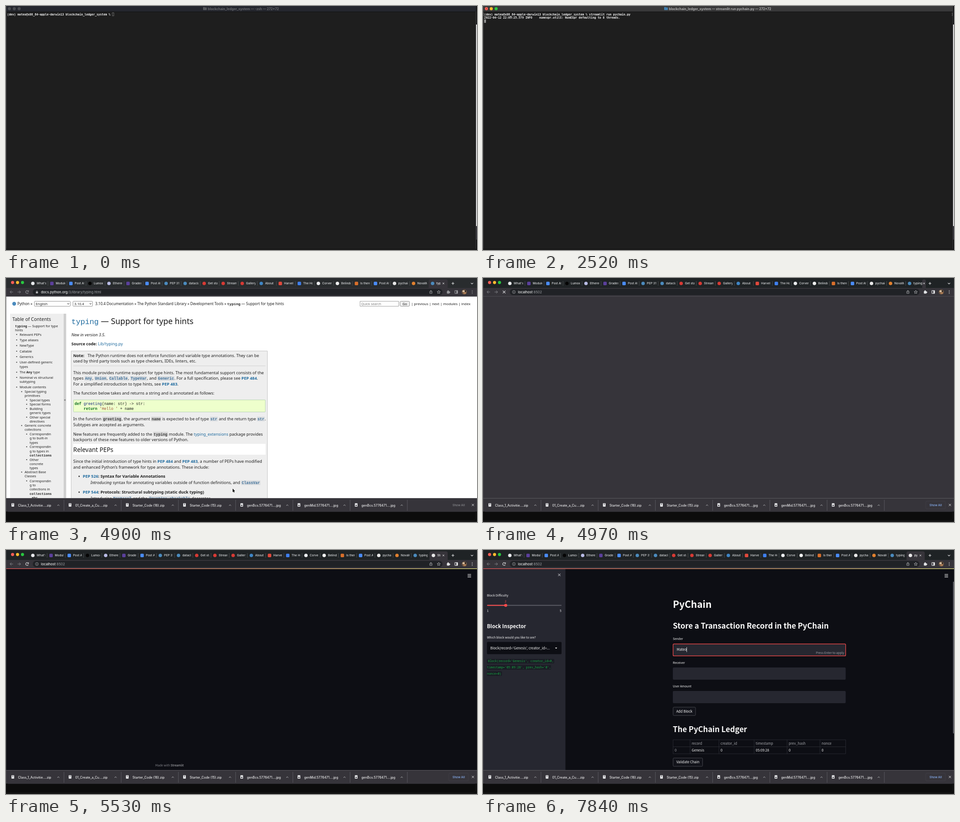
Recreate the animation shown at these times as an HTML page with a canvas. Size 1037 by 540 pixels, loop 8 s.

```html
<!DOCTYPE html>
<html lang="en">
<head>
<meta charset="utf-8">
<title>Ledger demo</title>
<style>
html, body { margin: 0; width: 100%; height: 100%; overflow: hidden; background: #1e1e1e; }
canvas { display: block; width: 1037px; height: 540px; }
</style>
</head>
<body>
<canvas id="stage"></canvas>
<script>
const W = 1037, H = 540, LOOP = 8000, STEP = 70;
const UI = 'Inter, sans-serif';
const TERM = '"DejaVu Sans Mono", monospace';
const DOC = '"Noto Sans", sans-serif';
const COURIER = '"Liberation Mono", monospace';
const APP = '"Noto Sans CJK JP", "Noto Sans CJK SC", "Open Sans", sans-serif';
const CODE = '"Noto Sans Mono", monospace';
const BAR = '#36343a', RED = '#ff4b4b', FIELD = '#262730', PAGE = '#0d0e14';

const canvas = document.getElementById('stage');
const c = canvas.getContext('2d');
const dpr = window.devicePixelRatio || 1;
canvas.width = W * dpr;
canvas.height = H * dpr;

const clamp = v => Math.max(0, Math.min(1, v));

// Text is set large and scaled down so that small advances stay fractional.
function text(s, x, y, size, color, o = {}) {
  const k = 8;
  c.save();
  c.translate(x, y + size * 0.36);
  c.scale(1 / k, 1 / k);
  c.font = `${o.style || 'normal'} ${o.weight || 400} ${size * k}px ${o.font || UI}`;
  c.textAlign = o.align || 'left';
  c.fillStyle = color;
  c.fillText(s, 0, 0);
  const w = c.measureText(s).width / k;
  c.restore();
  return w;
}

function box(x, y, w, h, fill, r = 0, stroke, lw = 1) {
  c.beginPath();
  c.roundRect(x, y, w, h, r);
  if (fill) { c.fillStyle = fill; c.fill(); }
  if (stroke) { c.strokeStyle = stroke; c.lineWidth = lw; c.stroke(); }
}

function dot(x, y, r, fill) {
  c.beginPath();
  c.arc(x, y, r, 0, 7);
  c.fillStyle = fill;
  c.fill();
}

function ring(x, y, r, color, lw, a = 0, b = 6.3) {
  c.beginPath();
  c.arc(x, y, r, a, b);
  c.strokeStyle = color;
  c.lineWidth = lw;
  c.stroke();
}

function line(color, lw, ...p) {
  c.beginPath();
  for (let i = 0; i < p.length; i += 2) c.lineTo(p[i], p[i + 1]);
  c.strokeStyle = color;
  c.lineWidth = lw;
  c.stroke();
}

function cross(x, y, r, color, lw = 1) {
  line(color, lw, x - r, y - r, x + r, y + r);
  line(color, lw, x - r, y + r, x + r, y - r);
}

function lights(x, y, gap, r, colors) {
  colors.forEach((col, i) => dot(x + i * gap, y, r, col));
}

// ---------- terminal ----------
const CELL = 3.787, ROW = 7.56;
const PROMPT = '(dev) mateo@x86_64-apple-darwin13 blockchain_ledger_system % ';
const COMMAND = 'streamlit run pychain.py';

function term(s, col, row, color = '#f4f4f4', weight = 700) {
  text(s, 2.6 + col * CELL, 18.5 + row * ROW, 6.29, color, { font: TERM, weight });
}

function terminal(t) {
  const active = t >= 490, running = t >= 1610;
  box(0, 0, W, H, '#1e1e1e');
  box(0, 0, 1035, 12.5, active ? '#39393a' : '#25272e');
  box(0, 12.5, 1035, 1, '#121212');
  lights(7.5, 6, 10.7, 3.4, active ? ['#ff5f57', '#febc2e', '#28c840'] : Array(3).fill('#4b4c50'));
  if (active) dot(7.5, 6, 0.9, '#8c1a14');

  const fx = running ? 399 : 434;
  const fold = active ? '#4589bd' : '#5c5e62';
  const crease = active ? '#2a648f' : '#404246';
  box(fx, 2.4, 3.5, 3, fold, 0.6);
  box(fx, 3.2, 7.8, 5.8, fold, 0.7);
  line(crease, 0.7, fx + 2.6, 4, fx + 2.6, 8.4);
  line(crease, 0.7, fx + 5, 4, fx + 5, 8.4);
  text(`blockchain_ledger_system — ${running ? COMMAND : '-zsh'} — 272×72`,
    fx + 10.3, 6, 7.13, active ? '#b4b4b5' : '#6b6c70', { weight: 700 });

  term(PROMPT, 0, 0);
  let col = 61, row = 0;
  if (t >= 1120) { term(COMMAND, 61, 0); col = 85; }
  if (t >= 1540) {
    line('#8b8b8b', 0.7, 2.2, 15.5, 1.2, 15.5, 1.2, 21.5, 2.2, 21.5);
    line('#8b8b8b', 0.7, 1032.3, 15.5, 1033.3, 15.5, 1033.3, 21.5, 1032.3, 21.5);
    col = 0; row = 1;
  }
  if (t >= 2520) {
    term('2022-04-12 22:09:25.579 INFO    numexpr.utils: NumExpr defaulting to 8 threads.', 0, 1);
    row = 2;
  }
  if (t >= 3570) {
    term('You can now view your Streamlit app in your browser.', 2, 3, '#5c40dd');
    row = 4;
  }
  if (t >= 3640) {
    term('Local URL:', 2, 5, '#5036c4', 400);
    term('http://localhost:8502', 13, 5, '#fff');
    term('Network URL:', 2, 6, '#5036c4', 400);
    term('http://192.168.0.31:8502', 15, 6, '#fff');
    row = 8;
  }
  const cx = 2.6 + col * CELL, cy = 14.6 + row * ROW;
  if (active) box(cx, cy, 3.8, 7.5, '#9b9b9b');
  else box(cx + 0.4, cy + 0.2, 3.4, 7, null, 0, '#8e8e8e', 0.7);

  box(0, 0, 0.8, H, '#4a4a4b');
  box(1034, 12, 1, 526, '#3d3d3e');
  box(1035, 0, 2, 41, '#101113');
  box(1035, 41, 2, 446, '#e4e4e4');
  box(1035, 487, 2, 30, '#313036');
  box(1035, 517, 2, 23, '#0d0d0d');
  box(0, 537.5, W, 1, '#131313');
}

// ---------- browser frame ----------
const TABS = [
  ["What's new", '#e8eaed'], ['Module', '#5b3f9c', 1], ['Post Att', '#4a8cf7', 1], ['Lumox', '#050505'],
  ['Ethereum', '#b9bce6'], ['Grades', '#5b3f9c', 1], ['Post Att', '#4a8cf7', 1], ['PEP 318', '#4b8bbe'],
  ['dataclass', '#4b8bbe'], ['Get started', '#d83a34'], ['Streamlit', '#d83a34'], ['Gallery', '#d83a34'],
  ['About', '#3f86c6'], ['Harvel', '#e2493c', 1], ['The House', '#3f7fee', 1], ['Corvent', '#eceef0'],
  ['Belindo', '#f2f2f2'], ['Is there', '#d96f2b', 1], ['Post Att', '#4a8cf7', 1], ['pychain', '#e9e9e9'],
  ['NovaWisp', '#e2812f'], ['typing', '#4b8bbe']
];

function tab(label, color, square, x, end, on) {
  if (square) box(x + 4.8, 8.3, 7.6, 7.6, color, 1.6);
  else dot(x + 8.6, 12, 3.8, color);
  c.save();
  c.beginPath();
  c.rect(x + 16, 2, Math.max(0, end - x - 16), 20);
  c.clip();
  text(label, x + 17, 12, 6.5, on ? '#f3f3f4' : '#dcdee0', { weight: 500 });
  c.restore();
}

function tabStrip(t) {
  const fresh = t >= 4970;
  const grow = Math.sin(clamp((t - 4970) / 210) * Math.PI / 2);
  const w = 922 / (TABS.length + grow), x0 = 50.5, end = 972.5;
  box(0, 0, W, 23, fresh ? '#1f2325' : '#292c2e');
  lights(14.5, 10, 10.9, 3.4, ['#ff5f57', '#febc2e', '#28c840']);
  const ax = fresh ? Math.min(x0 + 22 * w, 967) : x0 + 21 * w;
  const aw = Math.max(end - ax, 8);
  TABS.forEach(([label, color, square], i) => {
    const x = x0 + i * w, on = !fresh && i === 21;
    if (on) box(x, 3, w, 21, BAR, [4, 4, 0, 0]);
    else if (x + w < ax - 1) line('#53575a', 0.8, x + w, 7, x + w, 17);
    tab(label, color, square, x, on ? end - 16 : Math.min(x + w - 4, ax), on);
  });
  if (fresh) {
    box(ax, 3, aw, 21, BAR, [4, 4, 0, 0]);
    if (grow > 0.6) tab(t < 5740 ? 'Streamlit' : 'pychain', '#e9e9e9', 0, ax, end - 16, true);
  }
  cross(fresh ? end - 1.5 - 7.9 * grow : end - 9.4, 12, 1.8, '#e3e3e4', 0.9);
  line('#e4e5e6', 1.1, 981, 12, 987, 12);
  line('#e4e5e6', 1.1, 984, 9, 984, 15);
  line('#e4e5e6', 1.1, 1023.5, 10.8, 1026, 13.2, 1028.5, 10.8);
}

function toolbar(t) {
  const docs = t < 4970, loading = !docs && t < 5530;
  const ink = docs ? '#96979b' : '#e2e3e5', dim = '#85868b';
  box(0, 22, W, 19, BAR);
  line(dim, 1, 15.5, 31, 8.8, 31);
  line(dim, 1, 12, 27.8, 8.8, 31, 12, 34.2);
  line(dim, 1, 25.5, 31, 32.2, 31);
  line(dim, 1, 29, 27.8, 32.2, 31, 29, 34.2);
  if (loading) cross(46.5, 31, 2.9, ink, 1.1);
  else {
    ring(46.5, 31, 3, ink, 1.1, 0.5, 5.6);
    line(ink, 1.1, 49.6, 27.4, 49.6, 30, 47, 30);
  }
  box(59, 24, 902, 14, '#202226', 7);
  if (docs) {
    box(65.8, 30.2, 4.6, 3.8, '#b5b6b9', 0.5);
    ring(68.1, 30, 1.5, '#b5b6b9', 0.8, Math.PI, 2 * Math.PI);
  } else {
    ring(68, 31, 3.3, '#a8a9ad', 0.8);
    line('#a8a9ad', 0.9, 68, 30.6, 68, 33);
    line('#a8a9ad', 0.9, 68, 29, 68, 29.9);
  }
  const [host, rest] = docs ? ['docs.python.org', '/3/library/typing.html'] : ['localhost', ':8502'];
  const hw = text(host, 77, 31, 7.45, '#eceded', { weight: 500 });
  text(rest, 77 + hw, 31, 7.45, '#a2a5a9');
  line('#c3c4c7', 0.8, 934, 29.5, 933, 29.5, 933, 34, 938, 34, 938, 29.5, 937, 29.5);
  line('#c3c4c7', 0.8, 935.5, 32, 935.5, 27.3);
  line('#c3c4c7', 0.8, 934, 28.7, 935.5, 27.2, 937, 28.7);
  const star = [];
  for (let i = 0; i <= 10; i++) {
    const r = i % 2 ? 1.7 : 3.8, a = i * Math.PI / 5 - Math.PI / 2;
    star.push(952.8 + r * Math.cos(a), 31.2 + r * Math.sin(a));
  }
  line('#c3c4c7', 0.8, ...star);
  box(970.7, 29, 5.8, 5.6, ink, 0.8);
  dot(973.4, 28.6, 1.4, ink);
  dot(976.8, 31.6, 1.4, ink);
  box(988.2, 27.9, 6.2, 6.2, null, 0.6, ink, 1.1);
  box(991.5, 27.9, 3, 6.2, ink);
  dot(1009, 31, 5.8, '#6d5542');
  box(1005, 27.2, 5.2, 4, '#d9c2a4', 1.8);
  box(1007, 31.5, 6, 3.6, '#b08058', 1.6);
  box(1010, 27, 2.6, 4, '#2d2520', 1.2);
  [28, 31, 34].forEach(y => dot(1026.5, y, 0.85, ink));
  box(0, 40.3, W, 0.9, '#55545a');
}

const FILES = ['Class_1_Activitie....zip', '01_Create_a_Cu....zip', 'Starter_Code (16).zip',
  'Starter_Code (15).zip', 'genBcs.5776471....jpg', 'genMid.5776471....jpg', 'genBcs.5776471....jpg'];

function downloads(t) {
  box(0, 517, W, 23, '#0c0c0c');
  box(-8, 500, 1042, 36.5, null, 6, '#181818');
  box(0, 538, W, 2, '#171717');
  box(0, 487, W, 30.5, BAR, [0, 0, 5, 5]);
  box(0, 487, W, 0.9, '#5b5a5f');
  FILES.forEach((name, i) => {
    const x = i * 126;
    box(x + 12, 498.6, 6, 7.4, '#e7e8ea', 0.8);
    if (i < 4) line(BAR, 0.9, x + 15, 499, x + 15, 503);
    else box(x + 13.6, 502, 2.8, 2.4, BAR);
    text(name, x + 26.5, 503, 7.05, '#ececed', { weight: 500 });
    line('#b9babd', 1, x + 113, 504, x + 115.3, 501.8, x + 117.6, 504);
    box(x + 127.3, 491, 0.8, 24, '#626167');
  });
  const docs = t < 4970;
  if (!docs) box(975, 494, 43, 17, null, 2, '#424148', 0.8);
  text('Show All', 996.5, 502.3, 6.55, docs ? '#8a8b8f' : '#8ab4f8', { weight: 500, align: 'center' });
  cross(1028, 502.3, 2.4, '#dedfe1');
}

// ---------- documentation page ----------
const STYLES = {
  b: { weight: 700 },
  i: { style: 'italic' },
  a: { color: '#1f6b9f' },
  A: { color: '#1f6b9f', weight: 700 },
  c: { font: COURIER, weight: 700, bg: '#d6d6d6', color: '#3a3a3a' },
  k: { font: COURIER, weight: 700, bg: '#d9dcdf', color: '#3f7099' },
  m: { font: COURIER, weight: 700 },
  p: { font: COURIER },
  g: { font: COURIER, weight: 700, color: '#0a6a1b' },
  f: { font: COURIER, color: '#17247f' },
  s: { font: COURIER, color: '#a04a38' }
};

function rich(src, x, y, size = 8.97) {
  for (const [all, key, body] of src.matchAll(/\{(.):([^}]*)\}|[^{]+/g)) {
    const st = STYLES[key] || {}, s = body || all;
    const font = st.font || DOC, fs = st.font ? Math.min(size, 8.35) : size;
    if (st.bg) {
      box(x, y - 5, s.length * fs * 0.6 + 2, 10.2, st.bg);
      x += 1;
    }
    x += text(s, x, y, fs, st.color || '#1d1d1d', { ...st, font });
    if (st.bg) x += 1;
  }
}

const TOC = `20|106|{m:typing} — Support for type
20|115.5|hints
30|125|*Relevant PEPs
30|137|*Type aliases
30|149.5|*NewType
30|162|*Callable
30|174|*Generics
30|186.5|*User-defined generic
30|196|types
30|208.5|*The {m:Any} type
30|220|*Nominal vs structural
30|229.5|subtyping
30|241.5|*Module contents
41|251.5|*Special typing
41|260.5|primitives
52|270|*Special types
52|279.5|*Special forms
52|289|*Building
52|298|generic types
52|308|*Other special
52|317|directives
41|326.5|*Generic concrete
41|335.5|collections
52|345.5|*Correspondin
52|354.5|g to built-in
52|364|types
52|373.5|*Correspondin
52|383|g to types in
52|392|{m:collections}
52|402|*Other
52|411|concrete
52|420|types
41|429.5|*Abstract Base
41|438.5|Classes
52|449|*Correspondin
52|458|g to
52|467.5|collections in
52|477|{m:collections}
52|486|{m:.abc}`;

const BODY = `144|125.5|{i:New in version 3.5.}
144|146|{b:Source code:} {a:Lib/typing.py}
148|171.5|{b:Note:}   The Python runtime does not enforce function and variable type annotations. They can be
148|183.5|used by third party tools such as type checkers, IDEs, linters, etc.
148|209.5|This module provides runtime support for type hints. The most fundamental support consists of the
148|222|types {k:Any}, {k:Union}, {k:Callable}, {k:TypeVar}, and {k:Generic}. For a full specification, please see {A:PEP 484}.
148|234.3|For a simplified introduction to type hints, see {A:PEP 483}.
148|255|The function below takes and returns a string and is annotated as follows:
151|278|{g:def }{f:greeting}{p:(name: str) -> str:}
171|289|{g:return }{s:'Hello '}{p: + name}
148|312|In the function {c:greeting}, the argument {c:name} is expected to be of type {k:str} and the return type {k:str}.
148|324.5|Subtypes are accepted as arguments.
148|345.5|New features are frequently added to the {c:typing} module. The {a:typing_extensions} package provides
148|358|backports of these new features to older versions of Python.
148|406|Since the initial introduction of type hints in {A:PEP 484} and {A:PEP 483}, a number of PEPs have modified
148|419|and enhanced Python’s framework for type annotations. These include:
169|439|{A:PEP 526}{b:: Syntax for Variable Annotations}
186|453|{i:Introducing} syntax for annotating variables outside of function definitions, and {k:ClassVar}
169|474|{A:PEP 544}{b:: Protocols: Structural subtyping (static duck typing)}
186|488|{i:Introducing} {k:Protocol} and the {k:@runtime_checkable} decorator`;

function picker(label, x, w) {
  box(x, 51.5, w, 11, '#fff', 1, '#777', 0.8);
  text(label, x + 3, 57, 7.6, '#222', { font: DOC });
  line('#222', 1, x + w - 6.5, 56, x + w - 4.5, 58.2, x + w - 2.5, 56);
}

function docsPage() {
  box(0, 41, W, 446, '#fff');
  dot(18, 57, 4.2, '#4b8bbe');
  rich('Python »', 25, 57, 8.1);
  picker('English', 62.5, 79);
  picker('3.10.4', 147.5, 43);
  rich('3.10.4 Documentation » The Python Standard Library » Development Tools » {m:typing} — Support for type hints', 196.5, 57, 8.1);
  box(779.5, 51.5, 85, 11, '#fff', 0, '#888', 0.8);
  text('Quick search', 782, 57, 7.3, '#777', { font: DOC });
  box(867.5, 51.5, 21, 11, '#efefef', 2, '#777', 0.8);
  text('Go', 878, 57, 7.4, '#111', { font: DOC, align: 'center' });
  rich('| previous | next | modules | index', 892, 57, 7.8);

  box(9, 79, 118, 408, '#eee');
  box(127, 79, 5.5, 408, '#cfcfcf');
  text('«', 129.7, 269, 7.5, '#333', { font: DOC, align: 'center' });
  text('Table of Contents', 14, 91.5, 10.4, '#222', { font: DOC });
  for (const row of TOC.split('\n')) {
    const [x, y, s] = row.split('|');
    if (s[0] === '*') dot(x - 6.5, +y, 1.1, '#222');
    rich(s.replace('*', ''), +x, +y, 7.35);
  }

  const hw = text('typing', 144, 96, 16.7, '#1f6b9f', { font: COURIER });
  text(' — Support for type hints', 144 + hw, 95.5, 17.65, '#1a1a1a', { font: DOC, weight: 500 });
  box(143.5, 161.5, 432, 340, '#eee', 0, '#c4c4c4');
  box(148, 194, 423.5, 0.8, '#c8c8c8');
  box(148.5, 269.8, 422.5, 26.7, '#eeffcc', 1, '#aaccaa', 0.8);
  box(148, 367, 423.5, 24, '#fff');
  text('Relevant PEPs', 148, 380, 13.5, '#1a1a1a', { font: DOC, weight: 500 });
  for (const row of BODY.split('\n')) {
    const [x, y, s] = row.split('|');
    rich(s, +x, +y);
  }
  dot(161, 439, 1.4, '#222');
  dot(161, 474, 1.4, '#222');

  c.beginPath();
  [[499, 466], [499, 474], [500.9, 472.4], [502, 475], [503.1, 474.5], [502, 472], [504.4, 471.8]]
    .forEach(p => c.lineTo(...p));
  c.closePath();
  c.strokeStyle = '#fff';
  c.lineWidth = 1.2;
  c.stroke();
  c.fillStyle = '#000';
  c.fill();
}

// ---------- ledger app ----------
const app = (s, x, y, size, color = '#fafafa', o = {}) => text(s, x, y, size, color, { font: APP, ...o });
const SMALL = 6.7, NORMAL = 7.6, HEAD = 16.75;

function button(label, y, w) {
  box(418.5, y, w, 18.5, '#12131a', 2, '#4a4b52', 0.9);
  app(label, 418.5 + w / 2, y + 9.2, NORMAL, '#fafafa', { weight: 500, align: 'center' });
}

function field(label, y) {
  app(label, 418, y, SMALL, '#fafafa', { weight: 500 });
  box(418, y + 10.5, 380.5, 27, FIELD, 2);
}

function sender(t) {
  field('Sender', 197);
  const focus = clamp((t - 6510) / 280);
  if (focus) {
    c.globalAlpha = focus;
    box(418.5, 207.8, 380, 26.6, null, 2, RED, 1.2);
    c.globalAlpha = 1;
  }
  const typed = t < 7420 ? 0 : t < 7630 ? 1 : Math.min(5, 2 + Math.floor((t - 7630) / STEP));
  const w = app('Mateo'.slice(0, typed), 426.5, 220.5, NORMAL);
  if (typed) app('Press Enter to apply', 795, 228, SMALL, '#a0a1a7', { align: 'right' });
  if ((t >= 6580 && t < 7140) || typed) box(426.3 + w, 215, 0.8, 11, '#fafafa');
}

function ledger() {
  const cols = [418.5, 456, 519.5, 597, 669.5, 742, 798.5];
  const heads = ['', 'record', 'creator_id', 'timestamp', 'prev_hash', 'nonce'];
  const cells = ['0', 'Genesis', '0', '05:09:28', '0', '0'];
  cols.forEach(x => line('#2f3038', 0.8, x, 420, x, 451));
  [420, 435.5, 451].forEach(y => line('#2f3038', 0.8, 418.5, y, 798.5, y));
  heads.forEach((h, i) => {
    app(h, cols[i] + 3.5, 428.3, NORMAL, '#a6a7ac');
    app(cells[i], cols[i] + 3.5, 443.5, NORMAL, i ? '#fafafa' : '#a6a7ac', { weight: i ? 500 : 400 });
  });
}

function sidebar() {
  box(0, 42, 181.5, 445, FIELD);
  cross(168, 55, 2.7, '#a9aab0', 1.1);
  app('Block Difficulty', 8.7, 100.5, SMALL, '#fafafa', { weight: 500 });
  box(9, 121.6, 164, 1.9, '#5b5c65', 1);
  box(9, 121.6, 41, 1.9, RED, 1);
  dot(50, 122.5, 3.3, RED);
  app('2', 49.7, 113.5, SMALL, RED, { align: 'center' });
  app('1', 8.8, 134.3, SMALL);
  app('5', 172.8, 134.3, SMALL, '#fafafa', { align: 'right' });
  app('Block Inspector', 8.7, 169, 11.25, '#fafafa', { weight: 700 });
  app('Which block would you like to see?', 8.7, 193.5, SMALL, '#fafafa', { weight: 500 });
  box(8.7, 203.5, 164.3, 27, PAGE, 2);
  app("Block(record='Genesis', creator_id=...", 16, 217, NORMAL);
  c.beginPath();
  [[158.6, 216], [163.4, 216], [161, 218.6]].forEach(p => c.lineTo(...p));
  c.fillStyle = '#fafafa';
  c.fill();
  [["Block(record='Genesis', creator_id=0,", 11, 148], ["timestamp='05:09:28', prev_hash='0',", 9, 141], ['nonce=0)', 9, 33]]
    .forEach(([s, x, w], i) => {
      const y = 246 + i * 13.8;
      box(8.7, y - 5, w, 10, '#1a1c24', 1.5);
      text(s, x, y, 6.5, '#16a844', { font: CODE });
    });
}

function appPage(t) {
  if (t < 5250) { box(0, 41, W, 446, BAR); return; }
  box(0, 41, W, 446, PAGE);
  if (t < 5390) return;
  if (t < 5740) {
    const w = app('Made with ', 328.7, 477, SMALL, '#85868c');
    app('Streamlit', 328.7 + w, 477, SMALL, '#c2c3c7', { weight: 500 });
  } else {
    const slide = 1 - (1 - clamp((t - 5740) / 280)) ** 2;
    c.save();
    c.translate(-89 * (1 - slide), 0);
    app('PyChain', 418, 120.5, 20.95, '#fafafa', { weight: 700 });
    app('Store a Transaction Record in the PyChain', 418, 168.2, HEAD, '#fafafa', { weight: 600 });
    sender(t);
    field('Receiver', 249.5);
    field('User Amount', 301.5);
    button('Add Block', 347.8, 49.5);
    if (t >= 5810) {
      app('The PyChain Ledger', 418, 397, HEAD, '#fafafa', { weight: 600 });
      ledger();
    }
    if (t >= 5880) button('Validate Chain', 460.3, 65);
    c.restore();
    c.save();
    c.translate(-181.5 * (1 - slide), 0);
    sidebar();
    c.restore();
    if (t >= 5880) box(1034.8, 70, 2.2, 336, '#5c5d64', 1);
  }
  [54, 57, 60].forEach(y => line('#f0f0f1', 1.1, 1016.3, y, 1024, y));
  const g = c.createLinearGradient(0, 0, W, 0);
  g.addColorStop(0, RED);
  g.addColorStop(1, '#fffd80');
  box(0, 40.9, W, 1.2, g);
}

function browser(t) {
  if (t < 4970) docsPage();
  tabStrip(t);
  toolbar(t);
  if (t >= 4970) appPage(t);
  downloads(t);
  box(0, 0, 0.6, 517, '#4b4b4e');
}

function frame(now) {
  const t = Math.floor((now % LOOP) / STEP) * STEP;
  c.setTransform(dpr, 0, 0, dpr, 0, 0);
  if (t < 4900) terminal(t);
  else browser(t);
  requestAnimationFrame(frame);
}
requestAnimationFrame(frame);
</script>
</body>
</html>
```
